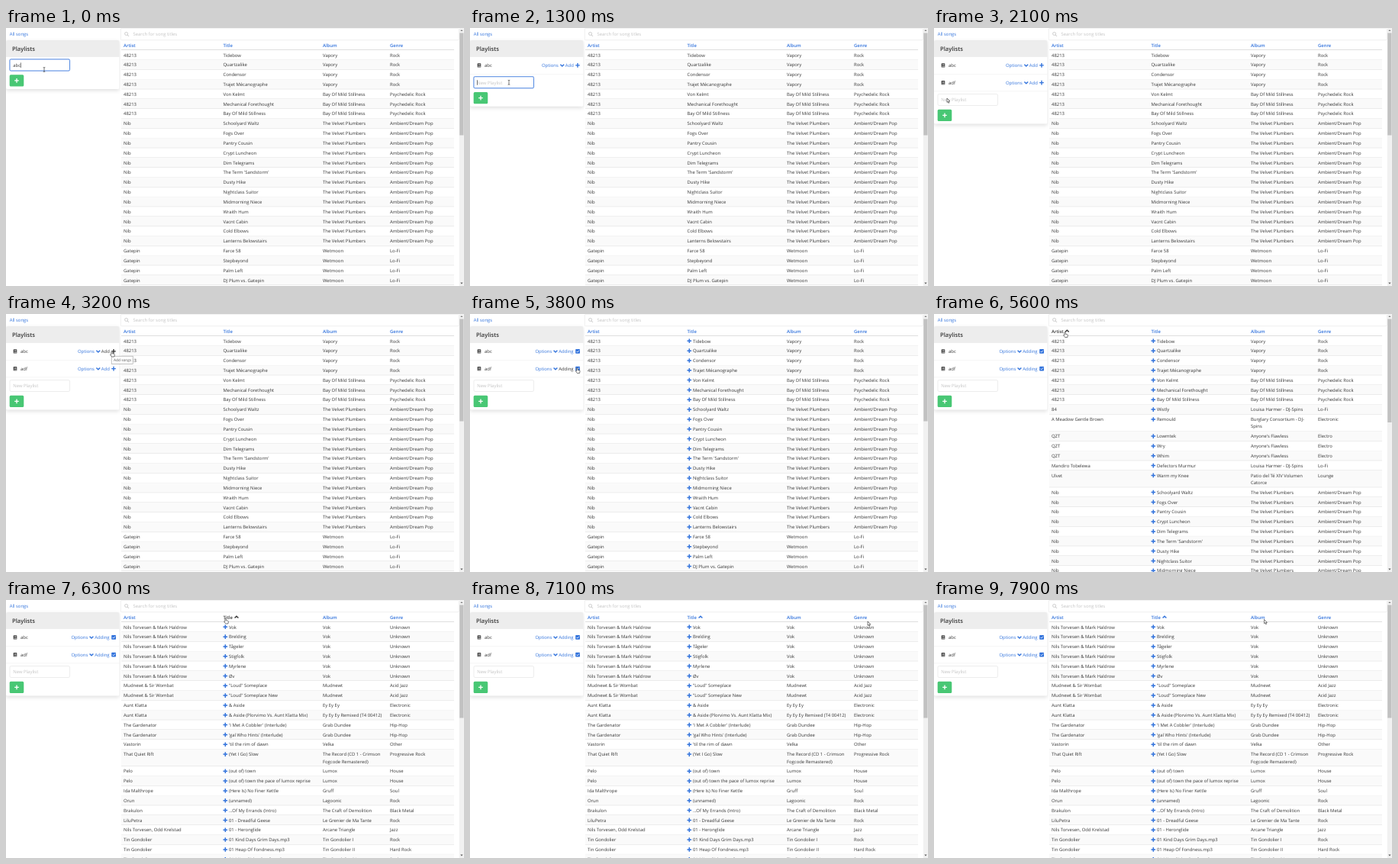
Write an HTML page that moves like this. It is 600 by 338 pixels and loops after 8000 ms.

```html
<!DOCTYPE html>
<html lang="en">
<head>
<meta charset="utf-8">
<title>Playlists</title>
<style>
  html, body { margin: 0; width: 100%; height: 100%; overflow: hidden; background: #fff; }
  svg { display: block; width: 600px; height: 338px; }
  text { font: 5.92px "Open Sans", "Noto Sans", sans-serif; fill: #363636; text-rendering: geometricPrecision; white-space: pre; }
  .head { font-weight: 600; }
  .link { fill: #3273dc; }
  .hint { fill: #c3c3c3; }
  .ico { fill: none; stroke: #3273dc; stroke-width: 1.4; }
  .dark text, .dark.link { fill: #363636; }
  .dark .ico, .dark.ico { stroke: #363636; }
  .panel { fill: #fff; filter: drop-shadow(0 2.5px 2.5px rgba(10, 10, 10, .13)); }
  .plus { display: none; }
  .adding .plus { display: inline; }
  .adding .song { transform: translateX(7.4px); }
</style>
</head>
<body>
<svg viewBox="0 0 600 338" id="stage"></svg>
<script>
const stage = document.getElementById('stage');
const $ = id => document.getElementById(id);
const esc = s => s.replace(/&/g, '&amp;');
const text = (x, y, s, cls = '', more = '') => `<text x="${x}" y="${y}" class="${cls}" ${more}>${esc(s)}</text>`;
const rect = (x, y, w, h, fill, more = '') => `<rect x="${x}" y="${y}" width="${w}" height="${h}" fill="${fill}" ${more}/>`;
const icon = (x, y, d, more = '') => `<path class="ico" d="M${x} ${y}${d}" ${more}/>`;
const plus = (x, y, more) => icon(x, y, 'm-2.8 0h5.6m-2.8-2.8v5.6', more);
const down = (x, y) => icon(x, y, 'm-2.4-1.2l2.4 2.4l2.4-2.4');

const COLS = [154, 284.5, 415, 503];
const HEADS = ['Artist', 'Title', 'Album', 'Genre'];
const ROW = 12.83, LINE = 9.33, STEP = 22.75;

// One line per song: artist|title|album|genre, "~" breaks a line
const parse = s => s.trim().split('\n').map(l => l.split('|'));
const group = (artist, album, genre, titles) => titles.split('|').map(t => [artist, t, album, genre]);

const numbers = [
  ...group('48213', 'Vapory', 'Rock', 'Tidebow|Quartzalike|Condensor|Trajet Mécanographe'),
  ...group('48213', 'Bay Of Mild Stillness', 'Psychedelic Rock', 'Von Kelmt|Mechanical Forethought|Bay Of Mild Stillness')
];
const plumbers = group('Nib', 'The Velvet Plumbers', 'Ambient/Dream Pop',
  "Schoolyard Waltz|Fogs Over|Pantry Cousin|Crypt Luncheon|Dim Telegrams|The Term 'Sandstorm'|Dusty Hike|" +
  'Nightclass Suitor|Midmorning Niece|Wraith Hum|Vacnt Cabin|Cold Elbows|Lanterns Belowstairs');

const lists = [
  [...numbers, ...plumbers,
    ...group('Gatepin', 'Wetmoon', 'Lo-Fi', 'Farce 58|Stepbeyond|Palm Left|DJ Plum vs. Gatepin')],
  [...numbers, ...parse(`
84|Wistly|Louisa Harmer - DJ-Spins|Lo-Fi
A Meadow Gentle Brown|Remould|Burglary Consortium - DJ-~Spins|Electronic
QZT|Lowmtek|Anyone's Flawless|Electro
QZT|Wry|Anyone's Flawless|Electro
QZT|Whim|Anyone's Flawless|Electro
Mandiro Tobelewa|Defectors Murmur|Louisa Harmer - DJ-Spins|Lo-Fi
Ulvet|Warm my Knee|Patio del Té XIV Volumen~Catorce|Lounge`), ...plumbers.slice(0, 9)],
  [...group('Nils Torvesen & Mark Haldrow', 'Vok', 'Unknown', 'Vok|Brelding|Tågeler|Stigfolk|Myrlene|Øv'),
    ...parse(`
Mudnewt & Sir Wombat|"Loud" Someplace|Mudnewt|Acid Jazz
Mudnewt & Sir Wombat|"Loud" Someplace New|Mudnewt|Acid Jazz
Aunt Klatta|& Aside|Ey Ey Ey|Electronic
Aunt Klatta|& Aside (Plorvimo Vs. Aunt Klatta Mix)|Ey Ey Ey Remixed (T4 00412)|Electronic
The Gardenator|'I Met A Cobbler' (Interlude)|Grab Dundee|Hip-Hop
The Gardenator|'gal Who Hints' (Interlude)|Grab Dundee|Hip-Hop
Vastorin|'til the rim of dawn|Velka|Other
That Quiet Rift|(Yet I Go) Slow|The Record (CD 1 - Crimson~Fogcode Remastered)|Progressive Rock
Pelo|(out of) town|Lumox|House
Pelo|(out of) town the pace of lumox reprise|Lumox|House
Ida Malthrope|(Here Is) No Finer Kettle|Gruff|Soul
Orun|(unnamed)|Lagoonic|Rock
Brakulon|...Of My Errands (Intro)|The Craft of Demolition|Black Metal
LiluPetra|01 - Dreadful Geese|Le Grenier de Ma Tante|Rock
Nils Torvesen, Odd Krelstad|01 - Heronglide|Arcane Triangle|Jazz
Tin Gondolier|01 Kind Days Grim Days.mp3|Tin Gondolier I|Rock
Tin Gondolier|01 Heap Of Fondness.mp3|Tin Gondolier II|Hard Rock
Tin Gondolier|01 Misty Ridge Stroll.mp3|Tin Gondolier IV|Rock`)]
];

function table(rows, id) {
  let y = 28.9, out = '';
  rows.forEach((row, i) => {
    const album = row[2].split('~'), base = y + 8.6;
    const h = ROW + LINE * (album.length - 1);
    if (i % 2) out += rect(151, y, 436, h, '#fafafa');
    out += rect(151, y + h - .4, 436, .4, '#d5d5d5');
    out += text(COLS[0], base, row[0]) + plus(COLS[1] + 2.8, base - 2.2, 'style="stroke-width:1.5"').replace('ico', 'ico plus');
    out += text(COLS[1], base, row[1], 'song') + text(COLS[3], base, row[3]);
    album.forEach((s, k) => out += text(COLS[2], base + LINE * k, s));
    y += h;
  });
  return `<g id="list${id}">${out}</g>`;
}

function playlist(name, i) {
  const book = rect(9.7, 46.2, 4.6, 5.4, '#444', 'rx=".7"') +
    '<path d="M11 47.7h2.4M11 48.9h2.4M10.5 50.5h3.6" stroke="#fff" stroke-width=".5"/>';
  const check = rect(138.2, 46.1, 5.8, 5.6, '#3273dc', 'rx=".8"') +
    '<path d="M139.5 48.9l1.2 1.2l2.3-2.4" fill="none" stroke="#fff" stroke-width=".9"/>';
  return `<g id="pl${i}" transform="translate(0 ${STEP * i})">${book}${text(19, 51.1, name)}
    ${rect(0, 60, 148.5, .4, '#e8e8e8')}
    <g id="idle${i}">${text(94, 51.1, 'Options', 'link')}${down(120.8, 48.9)}
      <g id="add${i}">${text(124.8, 51.1, 'Add', 'link')}${plus(141, 48.9)}</g></g>
    <g id="busy${i}">${text(85.5, 51.1, 'Options', 'link')}${down(112, 48.9)}
      <g id="tick${i}">${text(116.2, 51.1, 'Adding', 'link')}${check}</g></g></g>`;
}

stage.innerHTML = `
  ${text(4.8, 10.4, 'All songs', 'link')}
  <rect id="panel" class="panel" y="16" width="148.5" rx="2"/>
  <path d="M0 38V18q0-2 2-2h144.5q2 0 2 2v20z" fill="#ededed"/>
  ${text(8, 30, 'Playlists', 'head', 'style="font-size:7.6px"')}
  ${playlist('abc', 0)}${playlist('adf', 1)}
  <g id="form">
    <rect id="glow" x="4.2" y="40.3" width="80" height="16.4" rx="2" fill="#d3e0f7"/>
    <rect id="box" x="5" y="41" width="78.5" height="15" rx="1.6" fill="#fff"/>
    <text id="field" x="9.3" y="50.8"></text>
    <rect id="caret" y="45.4" width=".6" height="6.6" fill="#222"/>
    ${rect(4.7, 61.3, 18.6, 15.2, '#48c774', 'rx="1.6"')}
    ${plus(14, 68.9, 'style="stroke:#fff;stroke-width:1.3"')}
  </g>
  <g id="table">
    ${rect(150, 0, 450, 338, '#fff')}
    ${rect(150.3, .4, 443, 15.4, '#fff', 'rx="1.5" stroke="#dedede" stroke-width=".5"')}
    <circle cx="157.6" cy="7.5" r="2" fill="none" stroke="#c8c8c8" stroke-width=".9"/>
    <path d="M159.1 9l2 2" stroke="#c8c8c8" stroke-width="1"/>
    ${text(166.5, 10.4, 'Search for song titles', 'hint')}
    ${HEADS.map((s, i) => text(COLS[i], 24.5, s, 'head link', `id="h${i}"`)).join('')}
    <path id="sort" class="ico" d="M-2.4 1.2l2.4-2.4l2.4 2.4"/>
    ${lists.map(table).join('')}
    ${rect(151, 28.2, 436, .8, '#d8d8d8')}
  </g>
  ${rect(593.7, 0, 6.3, 338, '#f1f1f1')}
  <rect id="thumb" x="594.2" y="6.5" width="5.3" fill="#c1c1c1"/>
  <path d="M595.3 4l1.6-1.8l1.6 1.8z" fill="#777"/><path d="M595.3 333.6l1.6 1.8l1.6-1.8z" fill="#555"/>
  <g id="tip">${rect(138.2, 55.2, 28, 10.2, '#fff', 'stroke="#999" stroke-width=".6"')}
    ${text(141, 62, 'Add songs', '', 'style="font-size:4.8px;fill:#555"')}</g>
  <g id="cursor" stroke="#222" stroke-width=".6" fill="#fff">
    <path id="beam" d="M-1.3-3q1.3 0 1.3.7q0-.7 1.3-.7M0-2.5v5M-1.3 3q1.3 0 1.3-.7q0 .7 1.3 .7" fill="none"/>
    <path id="hand" d="M-.7 .6q.7-1.2 1.4 0v2.2l2.4.5q.8.3.7 1.1l-.5 2.6h-3.2l-2-2.6q.1-.9 1.2-.2z"/>
    <path id="arrow" d="M0 0v5.4l1.2-1.1l.9 2l.9-.4l-.9-1.9h1.7z"/>
  </g>`;

// Pointer stops: time, x, y, shape
const STOPS = [
  [0, 50, 54.5, 'beam'], [100, 50, 54.5, 'beam'], [500, 14, 68, 'hand'], [700, 14, 69, 'hand'],
  [900, 30, 72, 'beam'], [1200, 51, 71.3, 'beam'], [1700, 51, 71.5, 'beam'], [1900, 15, 91, 'hand'],
  [2100, 17, 92, 'arrow'], [2400, 122, 79, 'arrow'], [2600, 134, 66, 'hand'], [2800, 138.5, 49, 'hand'],
  [3400, 138.5, 49, 'hand'], [3700, 139.5, 70, 'hand'], [3900, 141, 71, 'arrow'], [4300, 292, 33, 'arrow'],
  [4500, 292, 33, 'hand'], [4600, 289, 24, 'hand'], [4700, 286, 22, 'arrow'], [4800, 272.4, 20.5, 'arrow'],
  [5200, 171.5, 23.5, 'hand'], [5700, 171.5, 23.5, 'arrow'], [6200, 287.6, 24, 'hand'], [6500, 287.6, 24, 'arrow'],
  [7100, 521, 28, 'arrow'], [7400, 521, 28, 'arrow'], [7900, 432.6, 25.5, 'arrow'], [8000, 432.6, 25.5, 'arrow']
];
function pointer(t) {
  t = Math.max(0, t);
  const i = STOPS.findLastIndex(s => s[0] <= t), a = STOPS[i], b = STOPS[i + 1] || a;
  const u = (t - a[0]) / (b[0] - a[0] || 1), k = u * u * (3 - 2 * u);
  return { x: a[1] + (b[1] - a[1]) * k, y: a[2] + (b[2] - a[2]) * k, shape: a[3] };
}

const show = (id, on) => $(id).style.display = on ? '' : 'none';
const dark = (id, on) => $(id).classList.toggle('dark', on);
const WIDTHS = [17, 14, 21, 18];

function draw(t) {
  const count = t < 600 ? 0 : t < 2000 ? 1 : 2;
  const busy = [t >= 3300, t >= 3800];
  const order = t < 5600 ? 0 : t < 6300 ? 1 : 2;
  const p = pointer(t), over = pointer(t - 100);

  $('panel').setAttribute('height', 64 + STEP * count);
  $('form').setAttribute('transform', `translate(0 ${STEP * count})`);
  busy.forEach((on, i) => {
    const hot = over.x > 124 && over.x < 145 && Math.abs(over.y - 49 - STEP * i) < 4;
    show('pl' + i, i < count);
    show('idle' + i, !on);
    show('busy' + i, on);
    dark('add' + i, hot);
    dark('tick' + i, hot);
  });

  const value = t < 600 ? 'abc' : t >= 1500 && t < 2000 ? 'adf'.slice(0, (t - 1400) / 100) : '';
  const focus = t < 500 || t >= 1200 && t < 1900;
  const field = $('field');
  field.textContent = value || 'New Playlist';
  field.setAttribute('class', value ? '' : 'hint');
  $('caret').setAttribute('x', 9.2 + (value ? field.getComputedTextLength() : 0));
  show('caret', focus);
  show('glow', focus);
  $('box').setAttribute('stroke', focus ? '#3273dc' : '#dbdbdb');
  $('box').setAttribute('stroke-width', focus ? .8 : .5);

  const hot = COLS.map((x, i) => over.x >= x && over.x <= x + WIDTHS[i] + 2 && over.y > 17 && over.y < 25.3);
  hot.forEach((on, i) => dark('h' + i, on));
  show('sort', order);
  $('sort').setAttribute('transform', `translate(${order === 1 ? 174.3 : 302} 22.4)`);
  dark('sort', order > 0 && hot[order - 1]);
  lists.forEach((_, i) => show('list' + i, i === order));
  $('table').classList.toggle('adding', busy[0]);
  $('thumb').setAttribute('height', [134, 135.5, 148][order]);

  show('tip', t >= 3100 && t < 3300);
  $('cursor').setAttribute('transform', `translate(${p.x} ${p.y})`);
  ['beam', 'hand', 'arrow'].forEach(s => show(s, s === p.shape));
}

const start = performance.now();
function tick() {
  const t = (performance.now() - start) % 8000;
  draw(Math.floor(t / 100) * 100);
  requestAnimationFrame(tick);
}
tick();
</script>
</body>
</html>
```
